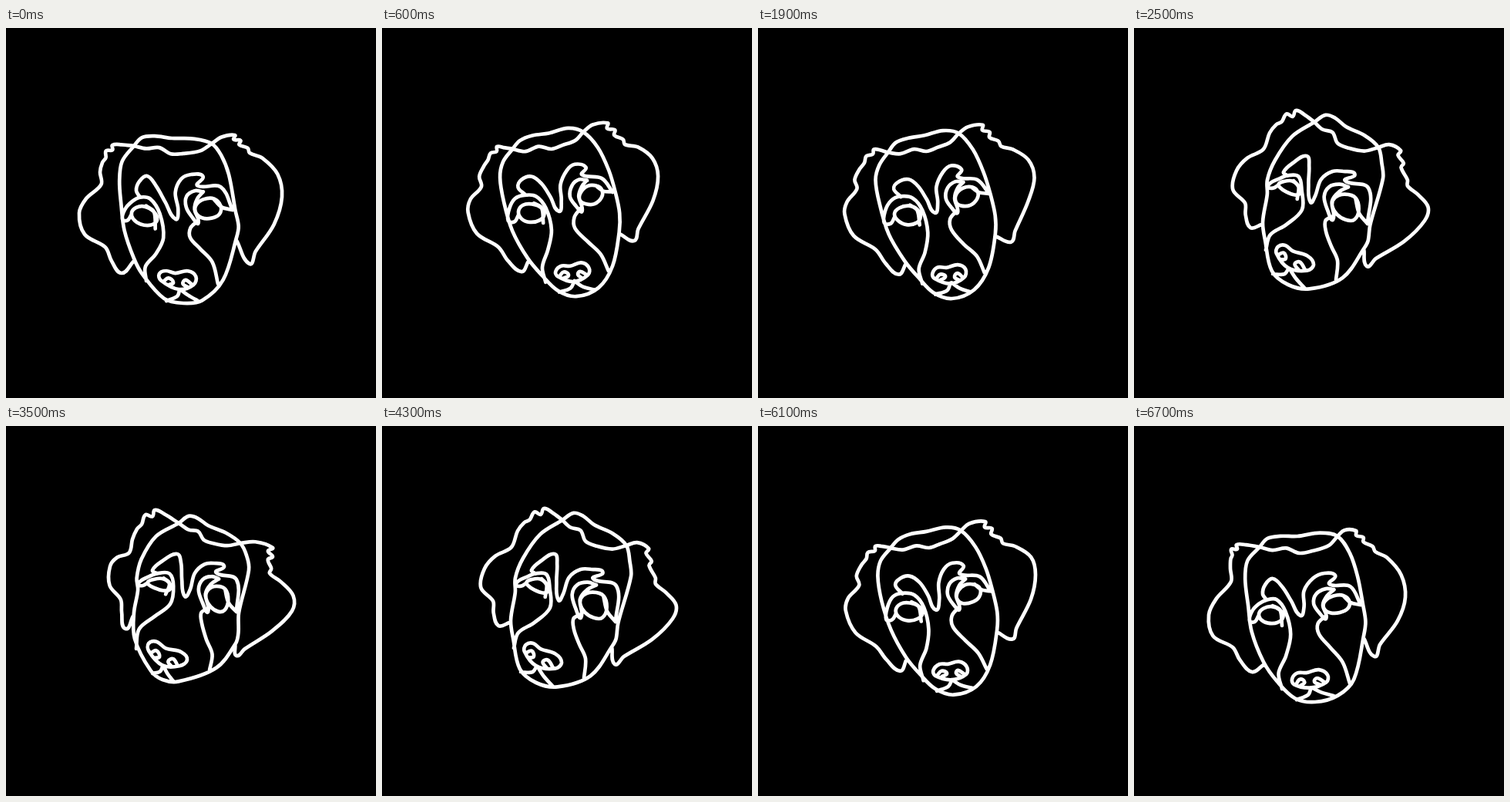
An HTML page that plays this animation: 480 by 480 pixels, repeating every 6800 ms.

```html
<!DOCTYPE html>
<html lang="en">
<head>
<meta charset="utf-8">
<title>Line dog</title>
<style>
html, body { margin: 0; width: 100%; height: 100%; overflow: hidden; background: #000; }
svg { display: block; width: 100%; height: 100%; }
path { fill: none; stroke: #fff; stroke-width: 4.7; stroke-linecap: round; stroke-linejoin: round; }
</style>
</head>
<body>
<svg viewBox="0 0 480 480"><path id="dog"/></svg>
<script>
const STEP = 100, STEPS = 68;

const points = text => text.split(' ').map(p => p.split(',').map(Number));
const mix = (a, b, k) => a + (b - a) * k;

function line(text, loop = false) {
  return { pts: points(text), loop };
}

function oval(cx, cy, rx, ry, tilt) {
  const pts = [];
  for (let i = 0; i < 8; i++) {
    const a = i * Math.PI / 4, x = rx * Math.cos(a), y = ry * Math.sin(a);
    pts.push([
      cx + x * Math.cos(tilt) - y * Math.sin(tilt),
      cy + x * Math.sin(tilt) + y * Math.cos(tilt)
    ]);
  }
  return { pts, loop: true };
}

// The head is drawn once, tilted; every other pose is a warp of it
const head = [
  line('172,164 182,152 198,146 219,142 243,136 263,140 282,161 296,190 305,218 311,246 311,270 302,314 284,343 255,354 231,346 211,327 193,305 173,270 161,232 156,200 160,180', true),
  // ears and fringe
  line('172,164 161,161 153,161 152,167 144,169 141,178 134,186 128,200 131,212 118,229 115,245 127,273 155,291 168,308 186,323 194,309'),
  line('263,140 275,131 295,129 294,136 304,138 303,145 315,150 318,157 334,160 354,174 361,197 354,228 336,266 331,281 312,273'),
  line('172,164 188,166 206,160 222,163 236,158 253,151 263,140'),
  // brows
  line('188,222 179,212 184,203 198,199 211,208 222,225 232,243 236,230 235,209 242,190 253,182 267,186 262,196 288,200 302,218'),
  // left eye and muzzle
  oval(197, 246, 17, 12, 0.1),
  line('180,248 175,257 167,256 168,240 176,227 188,222 204,224 216,240 223,268 219,294 212,316 216,335'),
  line('200,233 210,239 213,259'),
  // right eye and muzzle
  oval(274, 222, 16, 12, -0.4),
  line('269,203 259,202 249,210 247,224 254,236 262,243 258,224 262,211 269,203'),
  line('281,210 290,217 302,218'),
  line('261,240 252,251 254,265 270,283 287,299 297,320'),
  // nose and mouth
  line('229,321 236,314 248,314 262,310 272,316 271,326 252,334 231,328', true),
  line('234,328 240,322 246,326 240,330'),
  line('269,326 261,321 258,326 264,330'),
  line('253,334 248,343 233,348'),
  line('254,334 264,341 279,345')
];

// Landmarks in the drawn pose: skull, ears, eyes, brows, muzzle
const base = points('172,164 219,142 263,140 296,190 311,270 255,354 193,305 157,205 153,161 128,200 115,245 186,323 295,129 318,157 361,197 331,281 197,246 274,222 232,243 179,212 198,199 253,182 302,218 251,322 254,265 222,268 216,335 233,348 297,320 279,345 167,256');

// The same landmarks elsewhere
const front = points('166,153 215,143 267,150 289,190 299,272 230,357 166,299 148,205 138,152 122,187 95,240 150,318 297,139 316,162 358,219 316,306 176,243 261,236 220,248 169,211 183,192 240,190 294,236 222,327 239,272 203,272 182,328 208,354 275,332 249,354 151,248');
const settled = points('163,157 212,143 264,143 290,195 298,272 235,358 168,306 145,205 133,154 125,185 97,245 153,319 288,136 313,163 352,222 312,299 175,244 262,232 216,246 167,218 180,198 247,191 294,232 226,328 240,270 202,270 192,341 211,355 280,334 259,350 150,253');
const turned = points('234,122 275,128 317,155 323,195 299,285 200,333 167,252 179,180 210,107 176,136 133,185 151,259 346,159 355,205 377,250 302,309 202,205 273,232 229,226 194,187 224,166 272,186 303,254 203,298 249,264 217,235 171,288 180,319 262,327 221,337 174,206');
const ruffled = points('224,126 262,129 304,152 315,187 298,282 203,329 166,242 173,180 193,109 164,147 135,182 155,263 346,158 342,191 371,240 299,298 198,204 272,224 232,221 190,187 222,166 270,178 299,241 205,298 254,256 212,230 169,289 190,321 264,317 217,331 172,206');

// Gauss-Jordan elimination; each row ends with an x and a y value
function solve(rows) {
  const n = rows.length;
  for (let c = 0; c < n; c++) {
    let best = c;
    for (let r = c + 1; r < n; r++) {
      if (Math.abs(rows[r][c]) > Math.abs(rows[best][c])) best = r;
    }
    [rows[c], rows[best]] = [rows[best], rows[c]];
    const pivot = rows[c][c];
    rows[c] = rows[c].map(v => v / pivot);
    for (let r = 0; r < n; r++) {
      const f = rows[r][c];
      if (r !== c && f) rows[r] = rows[r].map((v, i) => v - f * rows[c][i]);
    }
  }
  return rows.map(r => r.slice(n));
}

// Thin-plate terms: one per landmark, then the affine part
function terms([x, y]) {
  const bends = base.map(([a, b]) => {
    const d = ((x - a) ** 2 + (y - b) ** 2) / 1e4;
    return d ? d * Math.log(d) : 0;
  });
  return [...bends, 1, x / 100, y / 100];
}

function warpTo(target) {
  const rows = base.map((p, i) => [...terms(p), ...target[i]]);
  const flat = [() => 1, p => p[0] / 100, p => p[1] / 100];
  flat.forEach(f => rows.push([...base.map(f), 0, 0, 0, 0, 0]));
  const weights = solve(rows);
  return p => {
    const t = terms(p);
    return [0, 1].map(axis => t.reduce((sum, v, i) => sum + v * weights[i][axis], 0));
  };
}

const poses = [front, settled, base, turned, ruffled].map(target => {
  const warp = warpTo(target);
  return head.map(s => s.pts.map(warp));
});

// step, pose, dx, dy; the second half plays backwards
const keys = [
  [0, 0, 0, 0], [1, 1, 0, 0], [3, 1.1, -3, 3], [5, 1.9, -4, -7], [9, 2, 4, -3],
  [13, 2, 0, 0], [19, 2, -3, -3], [25, 3, 0, 0], [27, 3, -1, -5], [33, 4, 0, 0], [34, 4, 1, 0]
];

function stateAt(n) {
  const i = Math.max(1, keys.findIndex(k => k[0] >= n));
  const a = keys[i - 1], b = keys[i];
  const k = (n - a[0]) / (b[0] - a[0]);
  return [1, 2, 3].map(j => mix(a[j], b[j], k));
}

function jitter(seed) {
  const v = Math.sin(seed * 12.9898) * 43758.5453;
  return v - Math.floor(v) - 0.5;
}

// Smooth curve whose handles follow the neighbours and scale with each span
function curve(pts, loop) {
  const n = pts.length;
  const at = i => loop ? pts[(i + n) % n] : pts[Math.min(n - 1, Math.max(0, i))];
  const dir = i => {
    const a = at(i - 1), b = at(i + 1);
    const dx = b[0] - a[0], dy = b[1] - a[1], len = Math.hypot(dx, dy) || 1;
    return [dx / len, dy / len];
  };
  let d = 'M' + pts[0];
  for (let i = 0; i < (loop ? n : n - 1); i++) {
    const a = at(i), b = at(i + 1), u = dir(i), v = dir(i + 1);
    const h = Math.hypot(b[0] - a[0], b[1] - a[1]) / 3;
    const ends = [a[0] + u[0] * h, a[1] + u[1] * h, b[0] - v[0] * h, b[1] - v[1] * h, ...b];
    d += 'C' + ends.map(c => c.toFixed(1));
  }
  return d + (loop ? 'Z' : '');
}

function draw(n) {
  const [pose, dx, dy] = stateAt(n);
  const lo = Math.min(3, Math.floor(pose)), k = pose - lo;
  const still = Number.isInteger(pose) && !dx && !dy;
  const shake = still ? 0 : 1.3;
  return head.map(({ loop }, s) => curve(poses[lo][s].map((p, i) => {
    const q = poses[lo + 1][s][i], seed = n * 97 + s * 23 + i;
    return [
      mix(p[0], q[0], k) + dx + shake * jitter(seed),
      mix(p[1], q[1], k) + dy + shake * jitter(seed + 0.5)
    ];
  }), loop)).join('');
}

const dog = document.getElementById('dog');
const start = performance.now();
let shown = -1;

function tick() {
  const step = Math.floor((performance.now() - start) / STEP) % STEPS;
  const n = Math.min(step, STEPS - step);
  if (n !== shown) {
    dog.setAttribute('d', draw(n));
    shown = n;
  }
  requestAnimationFrame(tick);
}
tick();
</script>
</body>
</html>
```
